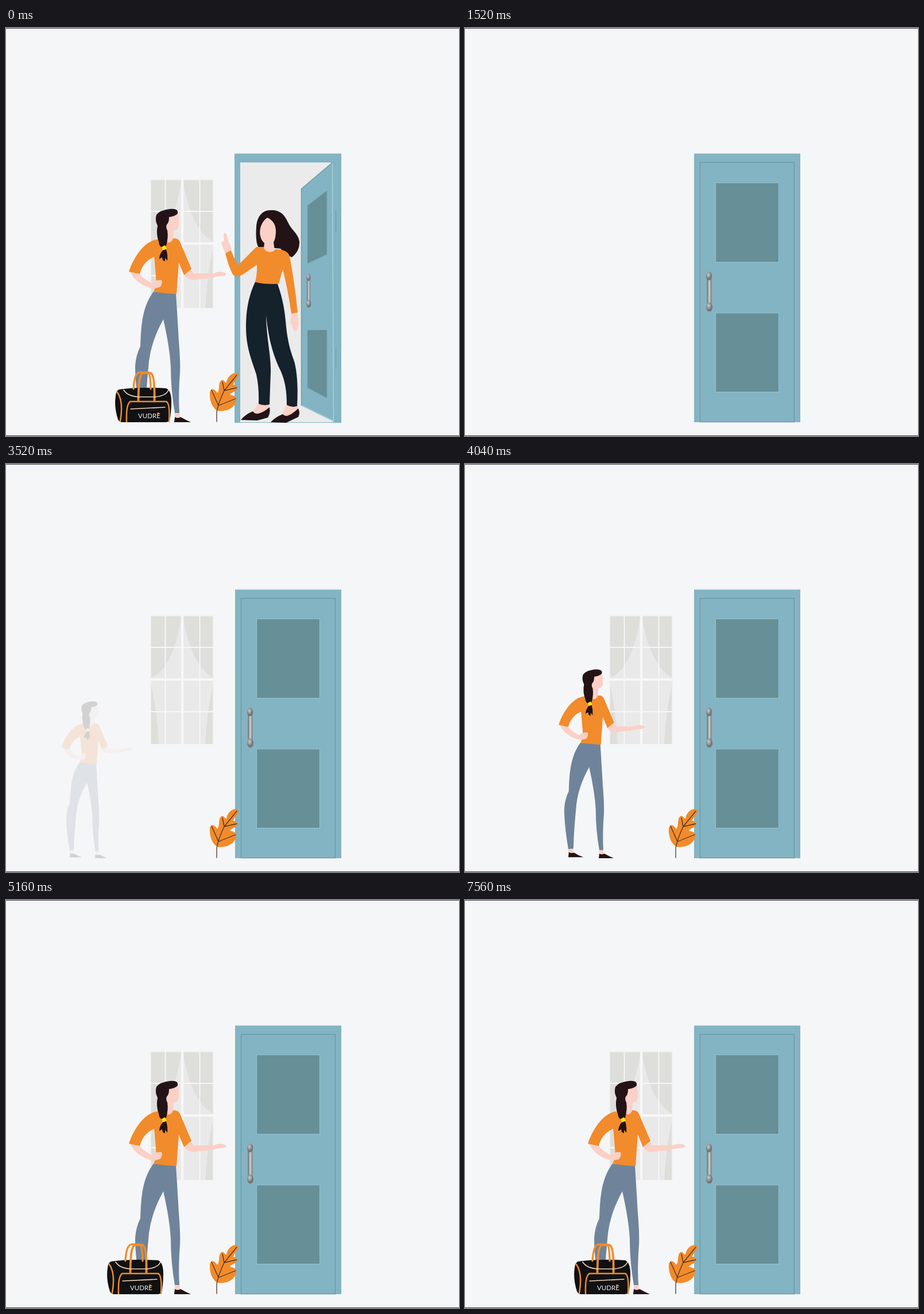
These frames come from a looping animation (789 by 710 pixels, 8 s). An HTML page:

```html
<!DOCTYPE html>
<html lang="en">
<head>
<meta charset="utf-8">
<title>At the door</title>
<style>
html, body { margin: 0; width: 100%; height: 100%; overflow: hidden; background: #f5f6f8; }
svg { display: block; width: 789px; height: 710px; }
.orange { fill: #f28b2b; }
.skin { fill: #fbd0c6; }
.hair { fill: #231316; }
.line { fill: none; stroke-linecap: round; stroke-linejoin: round; }
</style>
</head>
<body>
<svg viewBox="0 0 789 710">
  <defs>
    <linearGradient id="steel">
      <stop offset="0" stop-color="#666"/><stop offset=".5" stop-color="#d2d2d2"/><stop offset="1" stop-color="#777"/>
    </linearGradient>
    <radialGradient id="knob" cx=".4" cy=".35">
      <stop offset="0" stop-color="#ccc"/><stop offset="1" stop-color="#707474"/>
    </radialGradient>
    <g id="handle">
      <rect x="421.5" y="436" width="8" height="44" fill="url(#steel)"/>
      <ellipse cx="425" cy="431.5" rx="5.2" ry="7.5" fill="url(#knob)"/>
      <ellipse cx="425.5" cy="485.5" rx="5.5" ry="8" fill="url(#knob)"/>
    </g>
  </defs>
  <rect width="789" height="710" fill="#f5f6f8"/>

  <g id="scene">
    <g id="closed">
      <rect x="399" y="218.5" width="185" height="467.5" fill="#83b4c3"/>
      <rect x="409.5" y="234" width="164" height="451.5" fill="none" stroke="#6c9ca8" stroke-width="1.5"/>
      <g fill="#678f97" stroke="#93c1cc">
        <rect x="436.5" y="269.5" width="110" height="138"/>
        <rect x="436.5" y="496" width="110" height="137.5"/>
      </g>
      <use href="#handle"/>
    </g>

    <g id="open">
      <rect x="398" y="218.5" width="186" height="468.5" fill="#83b4c3"/>
      <path d="M408 234H566L570 686H408Z" fill="#ebebeb"/>
      <path d="M514 280L568 234L571 685L514 657Z" fill="#83b4c3"/>
      <path d="M514.5 657V280L568 234.5" class="line" stroke="#6b9ca8" stroke-width="1.5"/>
      <path d="M568.5 236L570.5 684L515 657" class="line" stroke="#a9d0d8" stroke-width="1.5"/>
      <path d="M574.5 318V354M574.5 558V592" class="line" stroke="#6b9ca8"/>
      <path d="M525 309L559 283V394L525 410ZM525 525.5H559V644L525 626Z" fill="#678f97" stroke="#78a6b0"/>
      <use href="#handle" transform="translate(208 67) scale(.75 .85)"/>
    </g>

    <g id="window">
      <rect x="251" y="263" width="111" height="225" fill="#f0f0ee"/>
      <path d="M253 265H360V487H253Z" fill="#dededb"/>
      <path d="M305 270Q290 357 253 372V385Q263 430 266 487H347Q350 430 360 385V372Q323 350 309 270Z" fill="#e9e9e9"/>
      <g class="line" stroke="#f7f7f7">
        <path d="M307 264V487" stroke-width="4.5"/>
        <path d="M253 375H360" stroke-width="4"/>
        <path d="M277.5 265V487M337.5 265V487M253 319H360M253 431H360" stroke-width="1.8"/>
      </g>
    </g>

    <g id="plant">
      <path class="orange" d="M368 666C358 660 354 646 355 633C358 625 364 629 368 635C373 631 369 617 375 613C380 611 380 617 384 617C385 608 392 601 400 600C405 599 406 605 403 609C399 614 397 618 395 621C400 620 403 624 402 629C399 634 393 633 390 638C395 640 401 640 401 646C401 659 386 669 368 666Z"/>
      <path class="line" stroke="#4a3426" stroke-width="1.3" d="M367 685V668Q370 652 380 631L402 604M358 630L370 657L400 645M377 616L380 631L402 626"/>
    </g>

    <g id="visitor">
      <path class="skin" d="M233 664H242L243 676H233ZM294 666H302L303 678H294Z"/>
      <path class="hair" d="M234 674Q240 677 244 675Q253 681 263 684H233ZM294 677Q299 680 304 677Q313 682 322 686H293Z"/>
      <path fill="#6f849a" d="M257 459L296 462Q299 510 301 545Q304 580 303 600Q300 640 302 670L294 670Q287 630 287 590Q285 555 274 507Q253 545 249 580Q244 630 243 667L233 668Q225 620 225 589Q226 570 234 554C235 520 237 485 257 459Z"/>
      <path class="skin" d="M216 424L232 427Q240 437 254 444Q264 437 271 439Q273 446 268 451Q257 455 244 450Q224 441 216 424ZM309 428L322 419L326 427Q346 427 362 427Q375 421 384 428Q383 432 371 432Q351 436 331 438Q316 440 309 428Z"/>
      <path class="orange" d="M262 368Q272 365 278 371Q286 377 291 366Q300 365 303 372L323 419L310 430L301 408L297 463Q276 462 257 459Q263 449 261 432L258 398Q238 407 233 428L214 424Q219 407 232 389Q246 371 262 368Z"/>
      <path class="skin" d="M254 444Q264 437 271 439Q273 446 268 451Q260 454 252 452Z"/>
      <path class="skin" d="M282 328L299 322Q302 333 301 342Q301 352 292 352L291 367Q286 377 278 371L280 348Q277 338 282 328Z"/>
      <path class="hair" d="M299 319Q297 314 285 315Q268 317 262 325Q259 335 264 344Q261 358 266 372Q267 380 272 382L279 379Q283 365 281 352Q278 347 280 342Q284 339 284 329Q294 328 299 323Z"/>
      <path fill="#fbe51c" d="M271 381L277 378L280 384L274 388Z"/>
      <path class="hair" d="M273 387L279 385Q282 395 281 405L277 400L277 406L273 404L272 399L267 402Q267 394 273 387Z"/>
    </g>

    <g id="bag">
      <path d="M197 629Q230 624 279 627Q288 631 288 650Q288 670 285 682Q283 686 278 686H203Q197 686 195 681Q188 660 191 640Q192 631 197 629Z" fill="#101113"/>
      <g class="line" stroke="#f28b2b">
        <path d="M194 634Q205 650 199 684M210 685Q209 653 217 650H279Q286 653 284 685" stroke-width="2.5"/>
        <path d="M222 628C223 610 226 600 233 599H247C251 601 252 618 252 628" stroke-width="3.2"/>
        <path d="M230.500 648C231 620 232 602 239 600L252 600.500C258 603 259 625 258.500 648" stroke-width="3.8"/>
      </g>
      <path class="line" d="M205 630Q212 641 232 642H260Q279 640 283 630M217 663L277 660" stroke="#f4d2b0" stroke-width="1.6"/>
      <text x="230" y="679" font-family="Lato, sans-serif" font-size="11.5" fill="#eee">VUDRE</text>
      <circle class="orange" cx="265" cy="671" r="2"/>
    </g>

    <g id="host">
      <path class="hair" d="M461 317C445 317 437 330 436 346Q434 373 440 382H458L478 384Q488 395 498 399Q512 388 511 372C509 357 497 352 491 338C485 324 476 316 461 317Z"/>
      <path class="skin" d="M382 392L376 377Q373 370 380 372L379 359Q381 354 384 359L388 373Q393 380 392 388ZM497 496L507 494L510 514Q508 528 503 528Q499 524 498 514L495 516Z"/>
      <path class="skin" d="M440 652H459L458 662Q448 673 436 671Q426 670 431 667ZM489 655H508L509 664Q500 674 489 675L481 672Z"/>
      <path class="hair" d="M409 682Q417 672 430 667Q437 678 459 660Q461 670 456 678Q442 682 437 683ZM461 686Q469 677 482 672Q489 681 509 662Q513 670 509 677Q496 683 488 687Z"/>
      <path fill="#15212b" d="M434 442Q454 447 472 443C479 461 485 485 487 510C490 545 495 560 501 577C507 595 509 625 507 658Q498 661 489 656C489 630 486 615 479 598C465 570 457 540 453 500C454 545 462 570 461 600L459 655Q449 658 440 654Q441 625 436 603C427 575 418 555 418 520C418 490 423 465 434 442Z"/>
      <path class="orange" d="M436 381H449Q458 393 469 385Q490 385 494 397Q503 445 508 495L497 497Q491 455 482 420L475 445Q454 447 434 442Q438 425 437 412L414 428Q402 436 395 429Q388 416 382 392L392 387Q397 401 404 413Q420 397 436 381Z"/>
      <path class="skin" d="M455 330C463 333 470 341 470 353Q470 366 466 373L468 387Q458 394 449 384L450 374C440 367 438 342 455 330Z"/>
    </g>

    <g id="cloud">
      <g fill="#15212b">
        <circle cx="318" cy="312" r="16"/><circle cx="338" cy="300" r="17"/><circle cx="361" cy="304" r="16"/>
        <circle cx="361" cy="321" r="15"/><circle cx="340" cy="315" r="15"/>
        <circle cx="327" cy="336.5" r="8"/><circle cx="315" cy="343" r="4.5"/>
      </g>
      <g fill="#fff" font-family="Inter, sans-serif" font-weight="700" font-size="9.8" text-anchor="middle">
        <text x="339.5" y="310">Beautician</text><text x="339.5" y="321">Here</text>
      </g>
    </g>
  </g>

  <path d="M0 .5H789M0 709.5H789" stroke="#444152"/>
</svg>
<script>
const LOOP = 8000;
const part = id => document.getElementById(id);
const progress = (t, from, to) => Math.min(1, Math.max(0, (t - from) / (to - from)));

function place(id, opacity, transform = '') {
  const node = part(id);
  node.setAttribute('opacity', opacity);
  node.setAttribute('transform', transform);
}

// Slides in horizontally from an offset while fading in.
function slide(id, t, from, to, offset) {
  const p = progress(t, from, to);
  place(id, Math.min(1, p * 2), `translate(${offset * (1 - p)} 0)`);
}

function visitor(t) {
  const p = progress(t, 3460, 4440);
  const size = 0.718 + 0.282 * p;
  const left = 89 + 125 * p;
  place('visitor', Math.min(1, p * 2.5),
    `translate(${left} 686) scale(${size}) translate(-214 -686)`);
}

function cloud(t) {
  const grow = 1 - 2 ** (-10 * progress(t, 6000, 6740));
  const shrink = 1 - 2 ** (10 * (progress(t, 6840, 7560) - 1));
  const size = t < 6840 ? grow : shrink;
  place('cloud', size > 0 ? 1 : 0, `translate(305 347) scale(${1.39 * size}) translate(-305 -347)`);
}

function draw(t) {
  const ending = t < 820;
  const time = ending ? LOOP : t;
  place('scene', ending ? 1 - progress(t, 20, 820) : 1);
  place('open', ending ? 1 : 0);
  place('host', ending ? 1 : 0);
  slide('closed', time, 820, 1520, -109);
  if (ending) place('closed', 0);
  slide('plant', time, 1640, 2360, -76);
  slide('window', time, 1970, 2690, 67);
  visitor(time);
  slide('bag', time, 4540, 5260, -102);
  cloud(time);
}

const start = performance.now();
function tick() {
  draw((performance.now() - start) % LOOP);
  requestAnimationFrame(tick);
}
draw(0);
requestAnimationFrame(tick);
</script>
</body>
</html>
```
